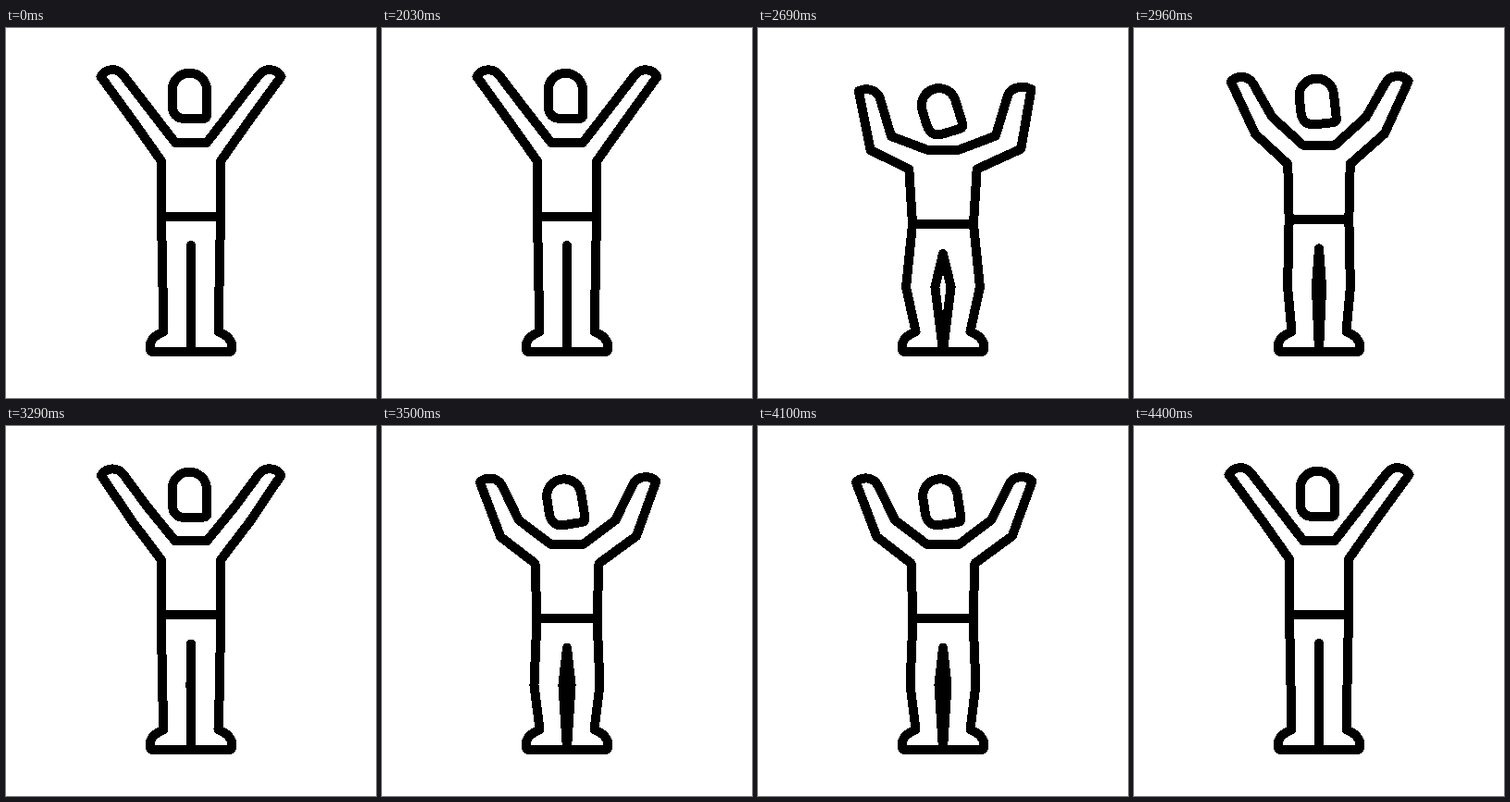
Animation, 400 px wide and 400 px high, one loop 4.46 s. Source, as an HTML page:

```html
<!DOCTYPE html>
<html lang="en">
<head>
<meta charset="utf-8">
<title>Squatting figure</title>
<style>
  html, body { margin: 0; width: 100%; height: 100%; overflow: hidden; background: #fff; }
  svg { display: block; width: 100vw; height: 100vh; }
</style>
</head>
<body>
<svg viewBox="0 0 400 400" fill="none" stroke="#000" stroke-width="10" stroke-linecap="round" stroke-linejoin="round" shape-rendering="crispEdges">
  <path id="left"/>
  <path id="right" transform="matrix(-1 0 0 1 400 0)"/>
  <path id="middle"/>
  <path id="head" d="M-18.8 -6 A18.7 18.5 0 0 1 18.6 -6 V20.5 Q18.6 24.8 14.5 24.8 H-4.5 Q-18.8 24.8 -18.8 10 Z"/>
</svg>
<script>
const LOOP = 4460, REST = 2000, SQUAT = 1200, END = 4400;
const el = id => document.getElementById(id);

// Each joint holds its standing x, y and its squatting x, y.
const body = {
  neck:     [183, 124,    182.5, 132],
  shoulder: [168, 144,    163, 153],
  waist:    [168, 204,    167, 212.4],
  knee:     [169.5, 280,  159.5, 280],
  crotch:   [200, 235,    200, 244.5],
  kneeIn:   [200, 280,    190.9, 280]
};
const leftArm = {
  elbowIn:  [152.5, 84.5, 143.5, 119],
  tipIn:    [127.5, 52,   132, 77],
  curveIn:  [120, 42,     128, 66],
  curveOut: [108, 43.5,   115, 66.5],
  tipOut:   [102.5, 52.5, 109.3, 69],
  elbowOut: [138.5, 102,  121, 133.5]
};
// Mirrored like the rest of the right side, but it bends deeper.
const rightArm = {
  ...leftArm,
  elbowIn:  [152.5, 84.5, 142.5, 118.5],
  tipIn:    [127.5, 52,   130.5, 75.5],
  curveIn:  [120, 42,     126.5, 62.5],
  curveOut: [108, 43.5,   111, 64],
  tipOut:   [102.5, 52.5, 104.7, 67],
  elbowOut: [138.5, 102,  114.7, 132]
};

const mix = (a, b, p) => a + (b - a) * p;

function place(joints, p) {
  const at = {};
  for (const [name, [x0, y0, x1, y1]] of Object.entries(joints)) {
    at[name] = [mix(x0, x1, p), mix(y0, y1, p)];
  }
  return at;
}

function side(arm, p) {
  const j = place({ ...body, ...arm }, p);
  // The outer elbow swings on an arc.
  const bend = 4 * p * (1 - p);
  j.elbowOut[0] -= 1.5 * bend;
  j.elbowOut[1] += 2 * bend;
  return `M${j.neck} L${j.elbowIn} ${j.tipIn}` +
    `C${j.curveIn} ${j.curveOut} ${j.tipOut}` +
    `L${j.elbowOut} ${j.shoulder} ${j.waist} ${j.knee} 170.5 328` +
    `L164 331.5 Q155.5 336.5 155.5 346 Q155.5 350 159 350` +
    `M${j.crotch} L${j.kneeIn} 200 349`;
}

function pose(p) {
  const { neck, waist } = place(body, p);
  const bar = ([x, y]) => `M${x} ${y} H${400 - x}`;
  el('left').setAttribute('d', side(leftArm, p));
  el('right').setAttribute('d', side(rightArm, p));
  el('middle').setAttribute('d', bar(neck) + bar(waist) + bar([159, 350]));
  el('head').setAttribute('transform',
    `translate(${mix(198.5, 197.3, p)} ${mix(73.2, 90.3, p)}) rotate(${-18 * p})`);
}

function depth(t) {
  if (t < REST || t >= END) return 0;
  return (1 - Math.cos((t - REST) / SQUAT * 2 * Math.PI)) / 2;
}

const start = performance.now();
function draw(now) {
  pose(depth(Math.max(0, now - start) % LOOP));
  requestAnimationFrame(draw);
}
draw(start);
</script>
</body>
</html>
```
